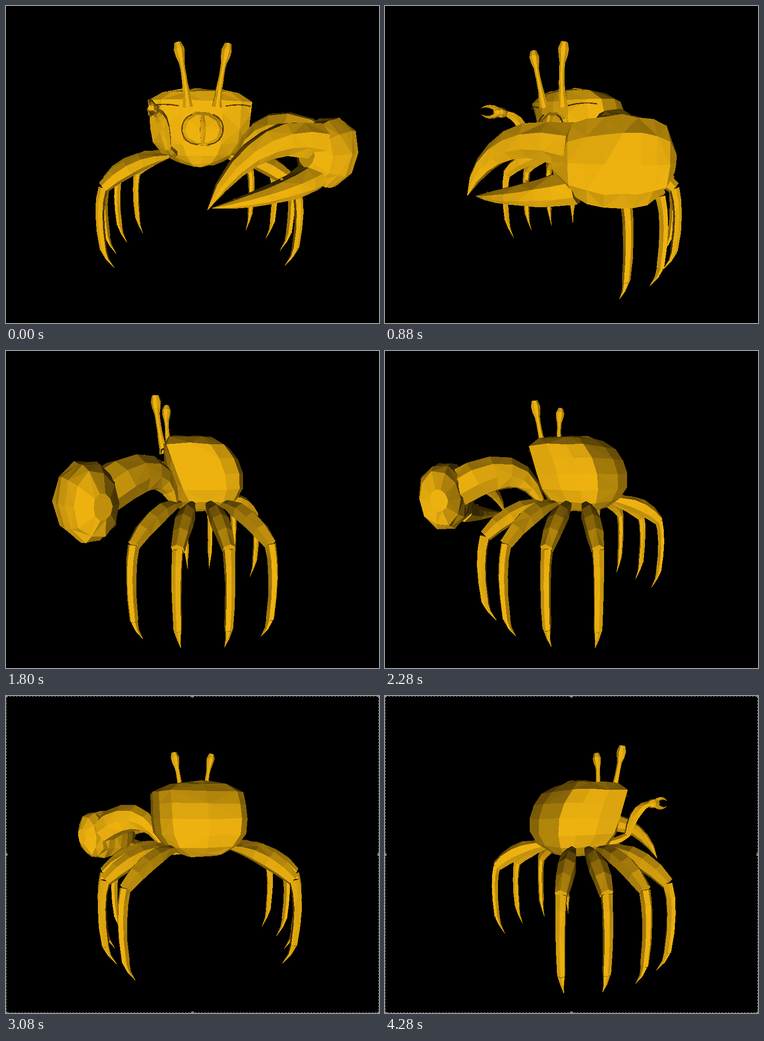
These frames come from a looping animation (812x690 px, 4360 ms). An HTML page with a canvas:

```html
<!DOCTYPE html>
<html lang="en">
<head>
<meta charset="utf-8">
<title>Crab turntable</title>
<style>
  html, body { margin: 0; width: 100%; height: 100%; overflow: hidden; background: #000; }
  canvas { display: block; }
</style>
</head>
<body>
<canvas id="stage" width="812" height="690"></canvas>
<script>
const W = 812, H = 690, LOOP = 4360, BORDER_FROM = 2680;
const ctx = document.getElementById('stage').getContext('2d');
const image = ctx.createImageData(W, H);
const pixels = new Uint32Array(image.data.buffer);
const depth = new Float32Array(W * H);

const { sin, cos, sqrt, min, max, PI } = Math;
const radians = degrees => degrees * PI / 180;
const list = (count, make) => Array.from({ length: count }, (_, i) => make(i));

// Vectors
const sub = (a, b) => a.map((v, i) => v - b[i]);
const dot = (a, b) => a[0] * b[0] + a[1] * b[1] + a[2] * b[2];
const cross = (a, b) => [a[1] * b[2] - a[2] * b[1], a[2] * b[0] - a[0] * b[2], a[0] * b[1] - a[1] * b[0]];
const unit = a => { const l = Math.hypot(...a) || 1; return a.map(v => v / l); };
const bezier = (a, b, c, t) => a.map((v, i) => (1 - t) ** 2 * v + 2 * t * (1 - t) * b[i] + t * t * c[i]);

let seed = 7;
const random = () => (seed = seed * 16807 % 2147483647) / 2147483647;
const jitter = amount => (random() * 2 - 1) * amount;

// Model: y is up from the ground, z is the crab's front
const UP = [0, 1, 0], SIDE = [1, 0, 0], FRONT = [0, 0, 1];
const faces = [];

function loft(rings, tone = 1) {
  const count = rings[0].length;
  for (let i = 0; i + 1 < rings.length; i++)
    for (let k = 0; k < count; k++) {
      const j = (k + 1) % count, p = rings[i], q = rings[i + 1];
      if ((i + k) % 2) faces.push([p[k], p[j], q[k], tone], [p[j], q[j], q[k], tone]);
      else faces.push([p[k], p[j], q[j], tone], [p[k], q[j], q[k], tone]);
    }
  for (const ring of [rings[0], rings[rings.length - 1]]) {
    const centre = [0, 1, 2].map(i => ring.reduce((sum, p) => sum + p[i], 0) / count);
    ring.forEach((p, k) => faces.push([p, ring[(k + 1) % count], centre, tone]));
  }
}

// A tube whose radius follows radius(t); `flat` scales it across `ref`
function tube(path, radius, ref, { sides = 8, flat = 1, tone = 1, rough = .06 } = {}) {
  const last = path.length - 1;
  loft(path.map((point, i) => {
    const t = unit(sub(path[min(i + 1, last)], path[max(i - 1, 0)])), along = dot(ref, t);
    const u = unit(ref.map((v, n) => v - along * t[n])), w = cross(t, u), r = max(.4, radius(i / last));
    return list(sides, k => {
      const angle = (k + .5) / sides * 2 * PI, size = r * (1 + jitter(rough));
      return point.map((v, n) => v + size * (u[n] * cos(angle) + flat * w[n] * sin(angle)));
    });
  }), tone);
}

// A tube along a curve from a to c, pulled towards b
const limb = (a, b, c, steps, radius, ref, options) =>
  tube(list(steps + 1, i => bezier(a, b, c, i / steps)), radius, ref, options);
const bulge = (base, extra) => t => base + extra * sin(PI * t);
const taper = (base, power) => t => base * (1 - t) ** power;
const groove = { sides: 4, tone: .38, rough: 0 };

// Carapace: horizontal slices, flat in front and round behind
loft(list(9, i => {
  const h = (1 - cos(PI * i / 8)) / 2, y = 194 + 145 * h;
  const belly = .38 + .62 * (1 - (1 - min(1, h / .5)) ** 3), roof = max(0, (h - .86) / .14);
  const width = 97 * belly * sqrt(1 - .88 * roof ** 2);
  const front = 67 * sqrt(belly * (1 - .5 * roof ** 2)), corner = 44 * min(1, h / .85);
  const back = -91 * sqrt(belly * (1 - ((y - 245) / 97) ** 2));
  const half = [
    ...list(3, k => [.38 * k * width, corner + (front - corner) * (1 - (.38 * k) ** 2.5)]),
    ...list(5, k => [width * max(0, cos(k * PI / 8)) ** .45, corner + (back - corner) * sin(k * PI / 8)])
  ];
  const mirrored = half.slice(1, -1).reverse().map(([x, z]) => [-x, z]);
  return [...half, ...mirrored].map(([x, z]) => [x, y + jitter(1.5), z]);
}));

// Mouth and nose
limb([0, 266, 56], [0, 266, 67], [0, 266, 78], 4, t => 33 * sqrt(1 - .95 * t ** 3), UP, { sides: 10, flat: 1.22 });
limb([0, 290, 74], [0, 265, 82], [0, 242, 75], 4, bulge(3, 3), SIDE, { sides: 6, flat: 1.4 });

for (const s of [-1, 1]) {
  const lip = list(9, i => {
    const a = PI * (.12 + .84 * i / 8);
    return [s * 37 * sin(a) ** .7, 266 + 28 * cos(a), 75];
  });
  tube(lip, () => 1.4, FRONT, groove);
  limb([s * 92, 308, 49], [s * 72, 313, 60], [s * 42, 307, 68], 4, () => 1.4, FRONT, groove);

  // Eye stalk with a knob near its end
  limb([s * 26, 306, 66], [s * 31, 358, 77], [s * 43, 411, 77], 10,
    t => 4.6 + 5 * (1 - t) ** 4 + 5.4 * Math.exp(-(((t - .87) / .12) ** 2)), SIDE);
}

// Legs: thigh, shin and claw in an upright plane through the axis
function leg(degrees) {
  const c = cos(radians(degrees)), s = sin(radians(degrees)), across = [-s, 0, c];
  const at = (reach, y) => [reach * c, y, reach * s];
  const hip = at(66, 212), knee = at(191, 160), ankle = at(196, 41);
  limb(hip, at(140, 208), knee, 5, t => 4 + 6 * t + 8 * sin(PI * t), across, { sides: 6, flat: 1.15 });
  limb(knee, at(205, 120), ankle, 4, t => 8.8 - 2.2 * t, across, { sides: 6 });
  limb(ankle, at(193, 22), at(178, 0), 2, taper(6, 1), across, { sides: 6 });
}
for (let k = 0; k < 4; k++) {
  leg(24 - 22 * k);
  leg(162 + 19.5 * k);
}

// Large claw: arm, palm, upper finger, lower finger with teeth
limb([76, 216, 36], [118, 308, 52], [205, 238, 112], 6, t => 8 + 24 * sin(.6 * PI * t), [.5, .2, -.84]);
limb([247, 227, 88], [212, 231, 134], [140, 229, 186], 8,
  t => 57 * (1 - Math.abs(2 * t - 1) ** 2.6 * .9) ** .5, UP, { sides: 10, flat: .68 });
limb([158, 248, 170], [50, 273, 219], [-8, 166, 233], 7, taper(30, .68), UP, { flat: .9 });
const jaw = [[160, 196, 168], [90, 176, 217], [-1, 165, 223]];
limb(...jaw, 7, taper(24, .75), UP);
for (const t of [.38, .8]) {
  const [x, y, z] = bezier(...jaw, t), size = 20 * (1 - t);
  limb([x, y + size * .6, z], [x - 3, y + size, z], [x - 6, y + size * 1.5, z], 2, taper(size * .6, 1), SIDE, { sides: 5 });
}

// Small claw
limb([-50, 219, 38], [-54, 220, 58], [-62, 234, 80], 3, bulge(6, 2), SIDE, { sides: 6 });
limb([-62, 232, 78], [-68, 290, 90], [-80, 296, 118], 5, bulge(6, 4.5), SIDE, { sides: 6 });
limb([-80, 296, 115], [-82, 297, 127], [-84, 298, 141], 4, bulge(5, 5), SIDE, { sides: 7 });
for (const s of [-1, 1])
  limb([-83, 298 + 4 * s, 134], [-86, 298 + 15 * s, 150], [-86, 298 + 6 * s, 165], 4, taper(5.5, .8), UP, { sides: 5 });

// Camera: slightly above, close enough for strong perspective
const CAMERA = 603, TILT_SIN = .134, TILT_COS = .991, LIFT = 190.6, CX = 421, CY = 345;
const LIGHT = unit([0, -.3, 1]);

function drawTriangle(a, b, c, color) {
  const area = (b[0] - a[0]) * (c[1] - a[1]) - (b[1] - a[1]) * (c[0] - a[0]);
  if (Math.abs(area) < 1e-6) return;
  const limits = (i, end) => [max(0, Math.floor(min(a[i], b[i], c[i]))), min(end, Math.ceil(max(a[i], b[i], c[i])))];
  const [x0, x1] = limits(0, W - 1), [y0, y1] = limits(1, H - 1);
  for (let y = y0; y <= y1; y++)
    for (let x = x0; x <= x1; x++) {
      const px = x + .5, py = y + .5;
      const u = ((b[0] - px) * (c[1] - py) - (b[1] - py) * (c[0] - px)) / area;
      const v = ((c[0] - px) * (a[1] - py) - (c[1] - py) * (a[0] - px)) / area;
      const w = 1 - u - v;
      if (u < 0 || v < 0 || w < 0) continue;
      const near = u * a[2] + v * b[2] + w * c[2], i = y * W + x;
      if (near > depth[i]) { depth[i] = near; pixels[i] = color; }
    }
}

function drawCrab(angle) {
  const c = cos(angle), s = sin(angle);
  const toView = ([x, y, z]) => {
    const turned = x * s + z * c;
    return [x * c - z * s, y * TILT_COS - turned * TILT_SIN - LIFT, y * TILT_SIN + turned * TILT_COS];
  };
  const toScreen = ([x, y, z]) => {
    const scale = CAMERA / (CAMERA - z);
    return [CX + x * scale, CY - y * scale, scale];
  };
  pixels.fill(0xff000000);
  depth.fill(0);
  for (const [p, q, r, tone] of faces) {
    const view = [p, q, r].map(toView);
    const normal = unit(cross(sub(view[1], view[0]), sub(view[2], view[0])));
    const towards = Math.sign(dot(normal, sub([0, 0, CAMERA], view[0])));
    const light = min(1, .22 + .82 * max(0, towards * dot(normal, LIGHT))) * tone;
    const color = (0xff000000 | 16 * light << 16 | 178 * light << 8 | 238 * light) >>> 0;
    drawTriangle(...view.map(toScreen), color);
  }
  ctx.putImageData(image, 0, 0);
}

function drawBorder() {
  ctx.strokeStyle = '#b4b4a8';
  ctx.lineWidth = 1;
  ctx.setLineDash([4, 3]);
  ctx.strokeRect(.5, .5, W - 1, H - 1);
  ctx.setLineDash([]);
  ctx.fillStyle = '#777';
  for (const x of [0, W / 2, W])
    for (const y of [0, H / 2, H]) {
      if (x === W / 2 && y === H / 2) continue;
      ctx.beginPath();
      ctx.arc(x, y, 3, 0, 2 * PI);
      ctx.fill();
      ctx.stroke();
    }
}

// Poses advance in a repeating 80, 80, 40 ms rhythm
let shown = -1;
const start = performance.now();
function tick() {
  const t = (performance.now() - start) % LOOP;
  const step = 3 * Math.floor(t / 200) + Math.floor(t % 200 / 80);
  if (step !== shown) {
    shown = step;
    drawCrab(radians(-4.5 + 3.77 * step));
    if (t >= BORDER_FROM) drawBorder();
  }
  requestAnimationFrame(tick);
}
tick();
</script>
</body>
</html>
```
